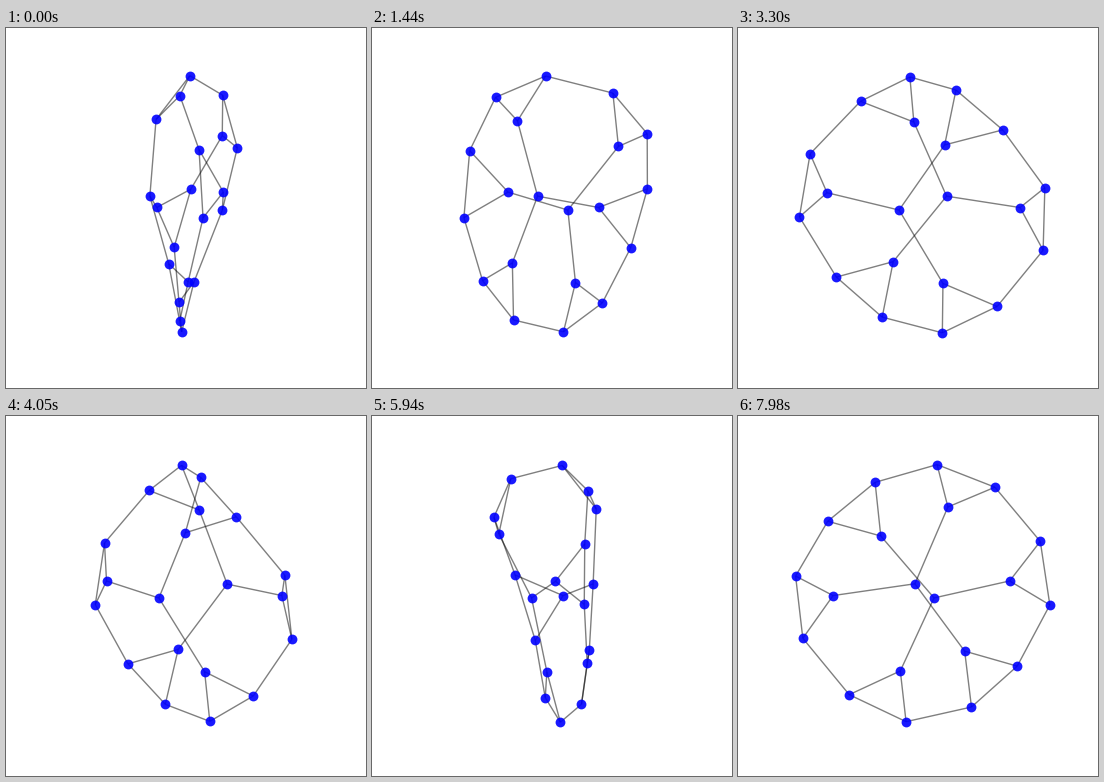
A matplotlib script that plays this animation: 360 by 360 pixels, repeating every 8000 ms.

```python
import numpy as np
import matplotlib.pyplot as plt
from matplotlib.animation import FuncAnimation
from matplotlib.collections import LineCollection

SIZE, DPI = 360, 100
LOOP, TICK, STEP = 8000, 20, 30       # ms: loop, timer, one degree of turn
CX, CY, EYE = 184.85, 178.0, 2000     # view centre and eye distance, px

# Node name -> place in space (a, b span the turning plane, y points down)
NODES = {
    "A": (-1.0, -14.2, -129.4), "B": (-10.6, -71.3, -106.5), "C": (-34.4, -22.3, -85.6),
    "D": (32.6, 46.3, -113.3), "E": (32.9, 94.3, -73.7), "F": (47.4, 39.8, -59.3),
    "G": (0.0, 127.0, -17.9), "H": (-35.6, 90.6, 1.55), "I": (-17.7, 120.0, 43.7),
    "J": (-12.3, 74.0, 99.8), "K": (3.1, 22.4, 77.0), "L": (-9.3, 17.4, 127.0),
    "M": (-10.9, -47.8, 112.6), "N": (-21.7, -40.0, 56.6), "O": (-2.6, -94.6, 72.3),
    "P": (11.4, -129.4, 11.1), "Q": (31.0, -90.8, -13.3), "R": (7.7, -119.2, -53.0),
    "S": (-41.2, 10.7, -10.0), "T": (31.3, -13.6, 4.0),
}
# Six triangles, the links around the ring, and two hubs
EDGES = ("AB BC CA DE EF FD GH HI IG JK KL LJ MN NO OM PQ QR RP "
         "AD EG IJ LM OP RB SC SH SN TF TK TQ").split()

names = list(NODES)
a, b, height = np.array(list(NODES.values())).T
links = np.array([[names.index(n) for n in e] for e in EDGES])


def project(degrees):
    c, s = np.cos(np.radians(degrees)), np.sin(np.radians(degrees))
    zoom = 1 / (1 - (a * s - b * c) / EYE)
    return np.column_stack([CX + (a * c + b * s) * zoom, CY + height * zoom])


fig = plt.figure(figsize=(SIZE / DPI, SIZE / DPI), dpi=DPI, facecolor="white")
ax = fig.add_axes([0, 0, 1, 1])
ax.set_xlim(0, SIZE)
ax.set_ylim(SIZE, 0)
ax.axis("off")

lines = LineCollection([], colors="black", alpha=0.5, linewidths=1, zorder=1)
ax.add_collection(lines)
dots = ax.scatter(a, b, s=np.full(len(names), 50), color="blue", alpha=0.9,
                  linewidths=0, zorder=2)


def draw(i):
    points = project((i * TICK + TICK // 2) // STEP)
    lines.set_segments(points[links])
    dots.set_offsets(np.floor(points + 0.5) + 0.5)   # dots sit on whole pixels
    return lines, dots


anim = FuncAnimation(fig, draw, frames=LOOP // TICK, interval=TICK,
                     init_func=lambda: draw(0), repeat=True, repeat_delay=0)
plt.show()
```
